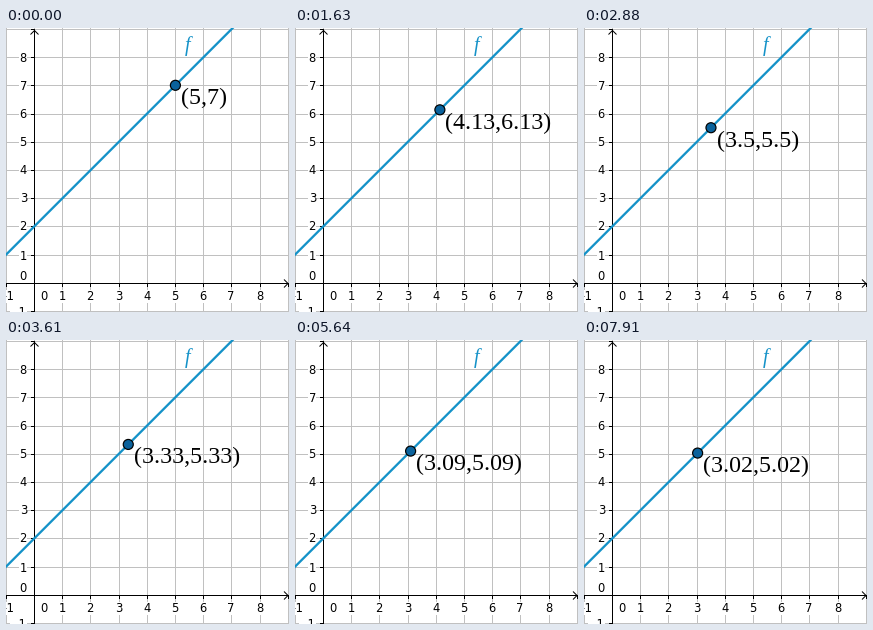
Write a matplotlib script that moves like this. It is 283 px wide and 284 px high and loops after 8 s.

```python
import numpy as np
import matplotlib.pyplot as plt
from matplotlib.animation import FuncAnimation
from matplotlib.patches import Circle

WIDTH, HEIGHT = 283, 284
ORIGIN_X, ORIGIN_Y, UNIT = 28.4, 254.7, 28.2
BLUE, DARK_BLUE, GRID = "#1592c8", "#0a629c", "#c0c0c0"
LOOP_MS, INTERVAL = 8000, 20

# The point closes in on x = 3, losing a fixed share of the gap per step.
START_MS, DECAY = 780, 0.9688
STEP_TIMES = [780, 1200, 2050, 2880, 4400, 5640, 7910]
STEP_COUNTS = [1, 10, 27, 44, 73, 97, 142]


def to_pixels(x, y):
    return ORIGIN_X + UNIT * x, ORIGIN_Y - UNIT * y


def grid_pixel(k):
    """Centres of the pixel column and row that hold grid line k."""
    return np.floor(28.5 + UNIT * k) + 0.5, np.floor(255.2 - UNIT * k) + 0.5


def segment(xs, ys, color, width=1.0, z=1):
    ax.plot(xs, ys, color=color, lw=width, zorder=z, snap=False,
            solid_capstyle="butt", solid_joinstyle="miter")


def tick_label(x, y, text, align):
    ax.text(x, y, text, ha=align, va="baseline", fontsize=11.5,
            family="DejaVu Sans", color="black", zorder=2,
            bbox=dict(facecolor="white", edgecolor="none", pad=0.5))


def draw_grid():
    for k in range(-1, 10):
        x, y = grid_pixel(k)
        segment([x, x], [0, HEIGHT], GRID)
        segment([0, WIDTH], [y, y], GRID)
        segment([x, x], [255, 259], "black", z=3)
        segment([25, 29], [y, y], "black", z=3)
        if k not in (0, 9):
            text = str(k).replace("-", "\u2212")
            tick_label(x - 0.5, 272, text, "center")
            tick_label(21, y + 4, text, "right")
    tick_label(37.5, 272, "0", "center")
    tick_label(21, 252, "0", "right")


def draw_axes():
    x, y = grid_pixel(0)
    segment([x, x], [2, HEIGHT], "black", z=3)
    segment([0, WIDTH - 1], [y, y], "black", z=3)
    segment([x - 4, x, x + 4], [6.5, 2.5, 6.5], "black", z=3)
    segment([278, 282, 278], [y - 4, y, y + 4], "black", z=3)


def step_at(t):
    if t < START_MS:
        return 0
    return int(np.interp(t, STEP_TIMES, STEP_COUNTS) + 1e-6)


def update(frame):
    t = (frame + 0.5) * INTERVAL
    x = 3 + 2 * DECAY ** step_at(t)
    px, py = to_pixels(x, x + 2)
    point.center = px, py
    label.set_position((round(px + 5.6), round(py + 19)))
    label.set_text(f"({round(x, 2):g},{round(x + 2, 2):g})")
    return point, label


fig = plt.figure(figsize=(WIDTH / 72, HEIGHT / 72), dpi=72, facecolor="white")
ax = fig.add_axes([0, 0, 1, 1])
ax.set_axis_off()
ax.set_autoscale_on(False)
ax.set_xlim(0, WIDTH)
ax.set_ylim(HEIGHT, 0)

draw_grid()
draw_axes()
(x0, y0), (x1, y1) = to_pixels(-2, 0), to_pixels(8, 10)
segment([x0, x1], [y0, y1], BLUE, 2.3, z=4)
ax.text(179, 23, "f", family="Liberation Serif", style="italic",
        fontsize=20, color=BLUE, zorder=5)

point = ax.add_patch(Circle((0, 0), 5, facecolor=DARK_BLUE,
                            edgecolor="black", lw=1.2, zorder=6))
label = ax.text(0, 0, "", family="Liberation Serif", fontsize=24,
                color="black", va="baseline", zorder=7)

anim = FuncAnimation(fig, update, frames=LOOP_MS // INTERVAL,
                     interval=INTERVAL, repeat=True, repeat_delay=0)
plt.show()
```
